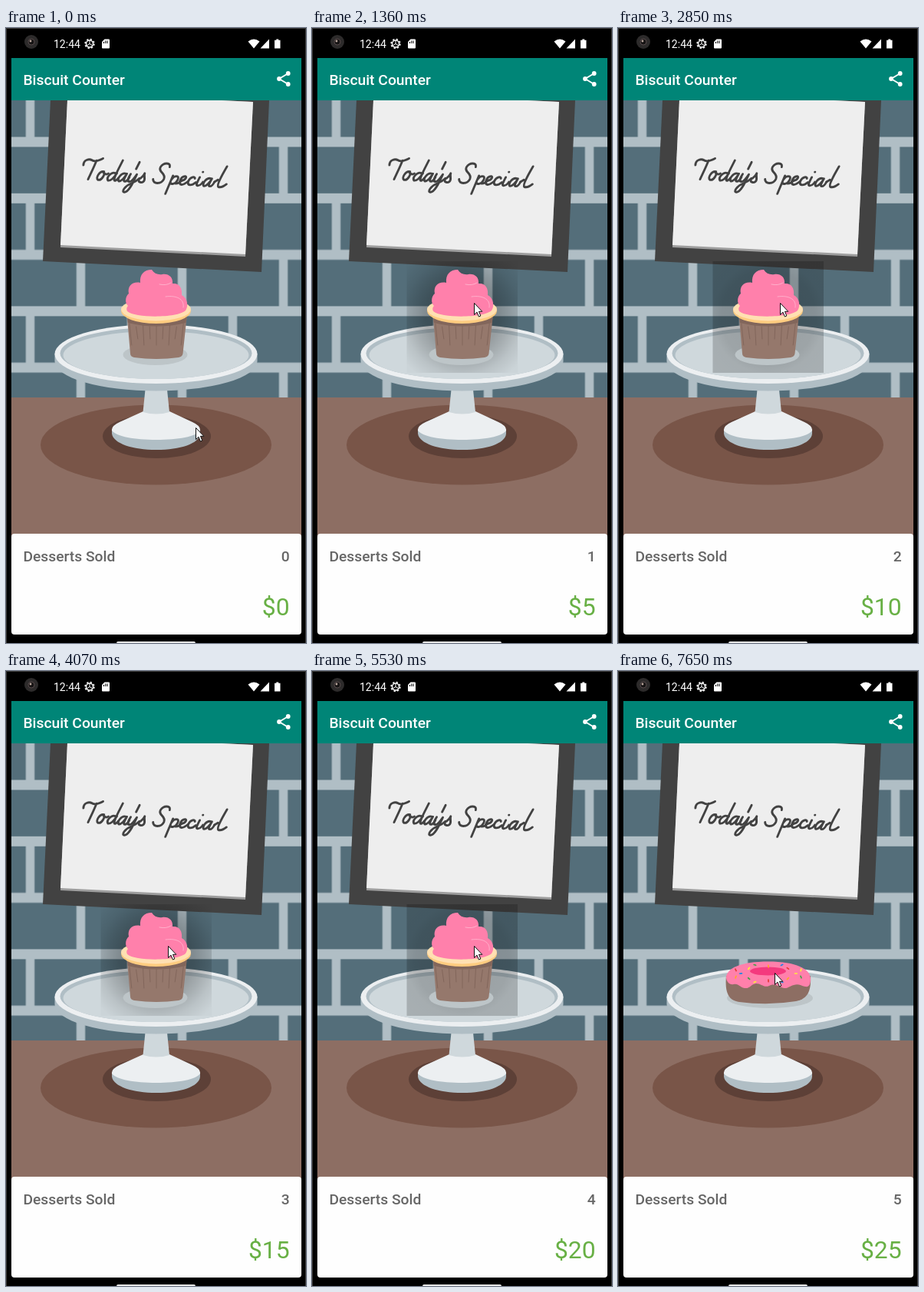
Write an HTML page that moves like this. It is 391 px wide and 799 px high and loops after 8 s.

```html
<!DOCTYPE html>
<html lang="en">
<head>
<meta charset="utf-8">
<title>Biscuit Counter</title>
<style>
  html, body { margin: 0; width: 100%; height: 100%; overflow: hidden; background: #000; }
  svg { display: block; width: 100%; height: 100%; }
  text { font-family: Roboto, Arial, sans-serif; }
  .medium { font-size: 19.25px; font-weight: 500; }
  .line { fill: none; stroke-linecap: round; stroke-linejoin: round; }
</style>
</head>
<body>
<svg viewBox="0 0 391 799">
  <defs>
    <pattern id="bricks" x="31.5" y="148" width="132" height="146.6" patternUnits="userSpaceOnUse">
      <rect width="132" height="147" fill="#b0bec5"/>
      <g fill="#546e7a">
        <path d="M0 6.5H60.3V66.8H0ZM71.7 6.5H132V66.8H71.7Z"/>
        <path d="M5.7 79.8H126.3V140.1H5.7Z"/>
      </g>
    </pattern>
    <radialGradient id="spot" gradientUnits="userSpaceOnUse" cx="196" cy="374" r="96">
      <stop offset="0" stop-opacity=".32"/>
      <stop offset=".5" stop-opacity=".27"/>
      <stop offset=".65" stop-opacity=".19"/>
      <stop offset=".8" stop-opacity=".1"/>
      <stop offset="1" stop-opacity=".02"/>
    </radialGradient>
    <radialGradient id="full" gradientUnits="userSpaceOnUse" cx="196" cy="375.5" r="102">
      <stop offset="0" stop-opacity=".27"/>
      <stop offset=".6" stop-opacity=".24"/>
      <stop offset=".72" stop-opacity=".2"/>
      <stop offset="1" stop-opacity=".19"/>
    </radialGradient>
  </defs>

  <rect width="391" height="799"/>
  <path class="line" d="M.5 799V.5H390.5V799" stroke="#3c3c3c"/>

  <!-- status bar -->
  <circle cx="33" cy="18" r="9" fill="#2d2b2b"/>
  <circle cx="33" cy="18" r="4" fill="#151313" stroke="#55494a"/>
  <circle cx="32" cy="17" r="1.4" fill="#b9a59c"/>
  <text x="62" y="26" font-size="14" fill="#fff">12:44</text>
  <g fill="none" stroke="#fff">
    <circle cx="109" cy="20.5" r="4.5" stroke-width="1.4"/>
    <circle cx="109" cy="20.5" r="5.9" stroke-width="1.6" stroke-dasharray="2.3 2.33"/>
    <path d="M109 20.5V16M109 20.5L105.2 22.8M109 20.5L112.8 22.8"/>
  </g>
  <g fill="#fff">
    <path d="M128.5 14.5H134Q135 14.5 135 15.5V25.5Q135 26.5 134 26.5H126Q125 26.5 125 25.5V18Z"/>
    <path d="M315.5 17.5Q323 11.5 330.5 17.5L323 26.5Z"/>
    <path d="M343 14.5V26.5H331.5Z"/>
    <path d="M352.3 14.5H355.2V15.7H357.5V26.5H350V15.7H352.3Z"/>
  </g>
  <path d="M127.5 18V20M129.8 16.5V20M132 16.5V20" stroke="#000"/>

  <!-- wall, sign and table -->
  <rect x="7" y="94" width="378" height="386" fill="url(#bricks)"/>
  <path d="M58 94H343L333 317L48 303Z" fill="#424242"/>
  <path d="M80 94H281L322 96L312 297L71 285Z" fill="#9e9e9e"/>
  <path d="M80 94H281L322 96L312 294L71 282Z" fill="#eee"/>
  <g class="line" stroke="#424242" stroke-width="2.9" transform="translate(98 196) rotate(3.3) skewX(-6)">
    <path d="M0 -18C-1 -25 6 -27 10 -25S18 -24 24 -28M16 -25C14 -16 11 -7 9 0"/>
    <path d="M28 -11C22 -12 18 -2 22 0C27 1 31 -9 27 -11C28 -8 32 -7 34 -9"/>
    <path d="M43 -10C37 -12 32 -3 35 0C39 1 43 -6 45 -10M50 -27C46 -15 42 -5 43 -1C44 1 46 -1 48 -4"/>
    <path id="a" d="M57 -10C51 -12 46 -3 49 0C52 1 56 -5 58 -10C56 -5 54 0 57 0C60 0 61 -3 62 -6"/>
    <path d="M63 -10C60 -4 60 0 63 0C66 0 69 -6 71 -10C68 0 65 13 59 14C54 14 58 6 66 2Q72 -1 75 -5M72 -26L69 -17"/>
    <path d="M75 -4Q80 -8 81 -12C80 -8 84 -4 81 -1C79 1 75 0 75 -2"/>
    <path d="M112 -22C113 -28 103 -28 100 -21C98 -14 109 -14 107 -6C105 1 94 2 93 -5"/>
    <path d="M118 -11L112 13M117 -6C120 -12 127 -12 125 -6C123 0 117 1 116 -2M123 -1Q127 -1 130 -5"/>
    <path d="M129 -5C136 -6 137 -12 133 -11C128 -10 126 0 131 0C134 0 137 -3 139 -5"/>
    <path d="M147 -9C147 -12 141 -11 139 -5C138 1 144 1 149 -4"/>
    <path d="M153 -11C151 -5 149 0 152 0C155 0 157 -3 158 -5M156 -18h.1"/>
    <use href="#a" x="111"/>
    <path d="M173 -6L177 -9M186 -27C182 -17 176 -2 179 0C182 1 186 -1 189 -4"/>
  </g>
  <rect x="7" y="480" width="378" height="180" fill="#8d6e63"/>
  <ellipse cx="195.5" cy="541.5" rx="150.5" ry="52" fill="#795548"/>
  <ellipse cx="196.5" cy="530.5" rx="70.5" ry="28.5" fill="#5d4037"/>

  <!-- cake stand -->
  <path d="M138 521V527C140 540 165 548 196 548S252 540 253 527V521Z" fill="#b0bec5"/>
  <path d="M179 498L148 512Q137 517 138 523C144 531 168 535 196 535S248 531 253 523Q254 517 243 512L213 498Z" fill="#eceff1"/>
  <path d="M182 465H209.5L213 499Q196 504 178.500 499Z" fill="#cfd8dc"/>
  <path d="M63.5 423V433A132 38.5 0 0 0 327.5 433V423Z" fill="#b0bec5"/>
  <ellipse cx="195.5" cy="423.5" rx="132" ry="38.5" fill="#eceff1"/>
  <ellipse cx="195.5" cy="422.5" rx="125" ry="33.5" fill="#b0bec5"/>
  <ellipse cx="195.5" cy="425" rx="121" ry="31" fill="#cfd8dc"/>

  <rect id="ripple" x="123.5" y="303" width="144.5" height="145"/>

  <g id="cupcake">
    <ellipse cx="194.5" cy="424.5" rx="42" ry="13.5" fill="#bdc5c8"/>
    <path d="M157.5 372H236L230.5 423Q230 427 225 428Q196 432 167 428Q162 427 162 423Z" fill="#95786c"/>
    <path d="M158 374H235.5L234.500 383Q196 392 159 383Z" fill="#82665b"/>
    <path id="pleats" class="line" stroke="#82665b"/>
    <ellipse cx="195.5" cy="367.5" rx="45.5" ry="16.5" fill="#ffcc80"/>
    <ellipse cx="195.5" cy="365.5" rx="45.5" ry="15" fill="#ffe0b2"/>
    <path d="M190 314C180 314 174 320 175 331C165 329 158 335 160 345C155 349 155 358 159 361Q156 364 158 368C168 377 224 377 234 367C238 362 237 351 229 347C230 338 226 331 217 332C218 324 212 319 204 320C198 321 193 319 190 314Z" fill="#ff80ab"/>
    <path class="line" d="M208 349C222 347 233 352 231 363M200 333Q209 335 215 331" stroke="#ffb0cb"/>
  </g>

  <g id="donut">
    <ellipse cx="198" cy="425" rx="56" ry="13" fill="#bdc5c8"/>
    <path d="M141 396C139 418 144 428 158 430Q196 435 232 429C248 426 252 414 251 396Z" fill="#8d6e63"/>
    <path d="M141 399C141 386 160 377.5 196 377.5S251 387 251 400C251 407 249 411 244 410C238 409 236 406 229 408C222 410 220 414 213 411C206 408 203 406 197 409C190 412 187 406 180 406C173 407 172 413 165 412C158 411 158 406 151 407C145 408 142 404 141 399Z" fill="#ff80ab"/>
    <ellipse cx="195.5" cy="390" rx="23.5" ry="5.5" fill="#f43a7e"/>
  </g>

  <!-- app bar and score card -->
  <rect x="7" y="39" width="378" height="55" fill="#008577"/>
  <text class="medium" x="22.4" y="74" fill="#fff">Biscuit Counter</text>
  <g fill="#fff">
    <path d="M367.7 59L356 66L367.7 73" fill="none" stroke="#fff" stroke-width="1.9"/>
    <circle cx="367.7" cy="59" r="2.9"/>
    <circle cx="356" cy="66" r="2.9"/>
    <circle cx="367.7" cy="73" r="2.9"/>
  </g>
  <rect x="7" y="657" width="378" height="131" rx="4" fill="#fefefe"/>
  <text class="medium" x="22.4" y="693" fill="#666">Desserts Sold</text>
  <g text-anchor="end">
    <text id="sold" class="medium" x="369.6" y="693" fill="#666">0</text>
    <text id="money" x="369.6" y="763" font-size="31.8" fill="#68b045">$0</text>
  </g>
  <rect x="144" y="797" width="103" height="4" rx="2" fill="#e4e4e4"/>

  <path id="cursor" d="M.5 .5V15.5L4 12.2L6.4 18L8.8 17L6.5 11.3H10.8Z" fill="#fff" stroke="#111"/>
</svg>
<script>
  const LOOP = 8000, PRICE = 5, DONUT_AT = 5;
  const STEP = 120, FADE = 660;
  const clicks = [1360, 2700, 4070, 5410, 6690];
  const $ = id => document.getElementById(id);

  const hold = (t, step) => Math.floor(t / step) * step;
  const clamp = u => Math.min(1, Math.max(0, u));
  const ease = u => u < .5 ? 4 * u ** 3 : 1 - 4 * (1 - u) ** 3;

  function buildDetails() {
    let pleats = "";
    for (let i = -4; i <= 4; i++) {
      const top = 196 + i * 8.8, foot = 196 + i * 7.3;
      pleats += `M${top} ${i % 2 ? 388 : 384}L${(top + foot) / 2} ${i % 2 ? 404 : 412}`;
    }
    $("pleats").setAttribute("d", pleats);

    // Sprinkles sit on two rings around the hole.
    const colors = ["#ffeb3b", "#43a047", "#ffa726", "#1e88e5", "#e53935"];
    const count = 16;
    for (let i = 0; i < count; i++) {
      const a = i / count * 2 * Math.PI, ring = i % 2 ? 1 : .78;
      const x = 196 + 46 * ring * Math.cos(a), y = 393 + 12 * ring * Math.sin(a);
      const dash = document.createElementNS("http://www.w3.org/2000/svg", "path");
      dash.setAttribute("d", "M-1.3 0H1.3");
      dash.setAttribute("transform", `translate(${x} ${y}) rotate(${i * 67})`);
      dash.setAttribute("stroke", colors[i % colors.length]);
      dash.setAttribute("stroke-width", 1.7);
      dash.setAttribute("class", "line");
      $("donut").append(dash);
    }
  }

  function drawCursor(t) {
    const arrive = ease(clamp(hold(t, 135) / 1040));
    const leave = clamp(hold(t - 7390, STEP) / (2 * STEP));
    const x = 247 - 36 * arrive - 7 * leave;
    const y = 519 - 162 * arrive + 35 * leave;
    $("cursor").setAttribute("transform", `translate(${x} ${y})`);
  }

  // A soft spot first, then the full square fading out in steps.
  function drawRipple(age) {
    const held = hold(age, STEP);
    $("ripple").setAttribute("fill", held ? "url(#full)" : "url(#spot)");
    $("ripple").setAttribute("opacity", age < FADE - 30 ? 1 - Math.max(0, held - STEP) / (FADE - STEP) : 0);
  }

  function draw(t) {
    const sold = clicks.filter(c => c <= t).length;
    $("sold").textContent = sold;
    $("money").textContent = "$" + sold * PRICE;
    $("cupcake").style.display = sold < DONUT_AT ? "" : "none";
    $("donut").style.display = sold < DONUT_AT ? "none" : "";
    drawCursor(t);
    drawRipple(sold ? t - clicks[sold - 1] : FADE);
  }

  const begin = performance.now();
  function loop() {
    draw((performance.now() - begin) % LOOP);
    requestAnimationFrame(loop);
  }
  buildDetails();
  loop();
</script>
</body>
</html>
```
